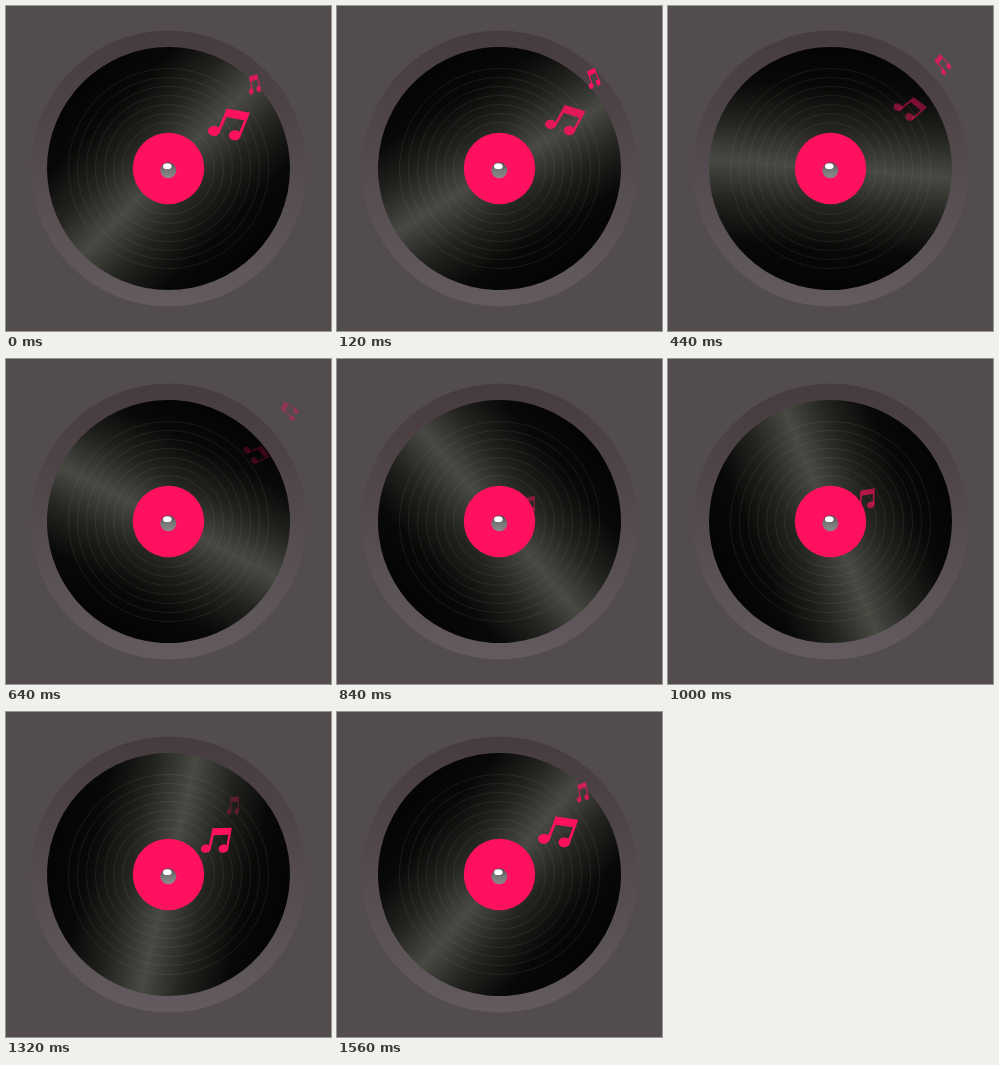
An HTML page with a canvas for the animation above (1600 ms loop, 325 by 325 pixels).

```html
<!DOCTYPE html>
<html lang="en">
<head>
<meta charset="utf-8">
<title>Spinning record</title>
<style>
  html, body { margin: 0; width: 100%; height: 100%; overflow: hidden; background: #534c4f; }
  canvas { display: block; width: 325px; height: 325px; }
</style>
</head>
<body>
<canvas id="stage" width="325" height="325"></canvas>
<script>
const ctx = document.getElementById('stage').getContext('2d');
const LOOP = 1600, STEP = 40, CENTER = 162.5, RADIUS = 121.5, PINK = '#ff1160';
const beamAndStems = new Path2D('M-10 10L-4.5-15H19L14 10H11.2L14.6-6.5H-3.2L-7.2 10Z');

const mix = (a, b, p) => a + (b - a) * p;

// Evenly spaced vertical gradient
function vertical(top, bottom, ...colors) {
  const g = ctx.createLinearGradient(0, top, 0, bottom);
  colors.forEach((color, i) => g.addColorStop(i / (colors.length - 1), color));
  return g;
}

function ellipse(x, y, rx, ry, fill, tilt = 0) {
  ctx.beginPath();
  ctx.ellipse(x, y, rx, ry, tilt, 0, Math.PI * 2);
  ctx.fillStyle = fill;
  ctx.fill();
}

function drawNote(x, y, degrees, scaleX, scaleY, opacity) {
  ctx.save();
  ctx.globalAlpha = opacity;
  ctx.translate(x, y);
  ctx.rotate(degrees * Math.PI / 180);
  ctx.scale(scaleX, scaleY);
  ellipse(-13, 9.5, 6, 5, PINK, -0.2);
  ellipse(8.3, 10, 6, 5, PINK, -0.2);
  ctx.fill(beamAndStems);
  ctx.restore();
}

// Grows to full size halfway, then shrinks and fades while turning clockwise
function drawBigNote(t) {
  const p = (t + 800) % LOOP / LOOP;
  const scale = 1 - Math.abs(p - 0.5);
  const opacity = Math.min(1, 0.4 + 2 * p, 2 * (1 - p));
  drawNote(mix(188, 257, p), mix(148, 88, p), -12 + 10 * p + 70 * p * p, scale, scale, opacity);
}

// Eases outwards while turning counterclockwise
function drawSmallNote(t) {
  const p = (t + LOOP - 1180) % LOOP / 1240;
  if (p >= 1) return;
  const eased = 1 - (1 - p) ** 1.4;
  const opacity = Math.min(1, 2.4 * p, 2.4 * (1 - p));
  drawNote(mix(216, 288, eased), mix(102, 49, eased), -78 * p ** 1.2, 0.37, 0.59, opacity);
}

function drawRecord(angle) {
  ctx.save();
  ctx.translate(CENTER, CENTER);
  ctx.rotate(angle);
  ellipse(0, 0, RADIUS, RADIUS, vertical(-RADIUS, RADIUS,
    '#040404', '#080807', '#22231f', '#484942', '#22231f', '#080807', '#040404'));
  ctx.strokeStyle = 'rgba(150,152,140,.15)';
  ctx.lineWidth = 0.8;
  for (let r = 46; r <= 100; r += 9) {
    ctx.beginPath();
    ctx.arc(0, 0, r, 0, Math.PI * 2);
    ctx.stroke();
  }
  ctx.restore();
}

function drawSpindle() {
  ellipse(CENTER, CENTER, 35.7, 35.7, PINK);
  ellipse(162.3, 164.3, 8, 8, vertical(156, 172, '#4c4a4b', '#777', '#8c8a8b'));
  ellipse(161.3, 160.2, 4.3, 2.9, '#fff');
}

function draw(t) {
  ctx.fillStyle = '#534c4f';
  ctx.fillRect(0, 0, 325, 325);
  ellipse(CENTER, CENTER, 138, 138, vertical(24, 301, '#463b3f', '#544b4f', '#635b5f'));
  drawRecord(Math.PI * (t / LOOP - 0.25));
  drawSpindle();
  drawBigNote(t);
  drawSmallNote(t);
}

const start = performance.now();
function tick() {
  const t = (performance.now() - start) % LOOP;
  draw(Math.floor(t / STEP) * STEP);
  requestAnimationFrame(tick);
}
tick();
</script>
</body>
</html>
```
